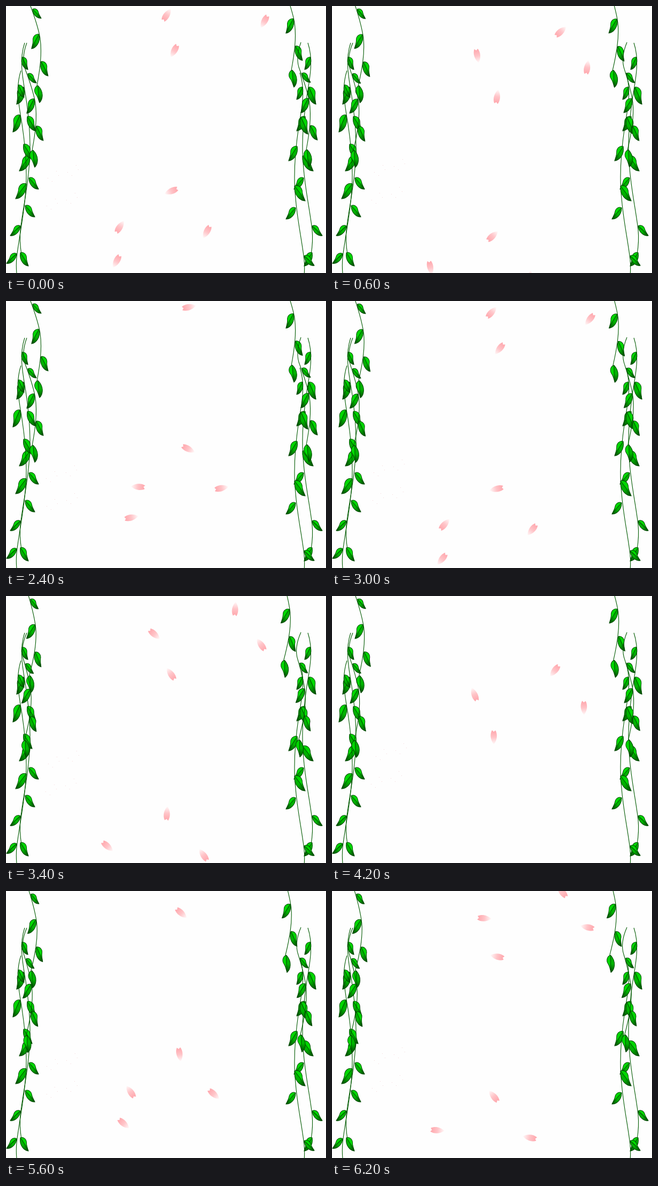
An HTML page with a canvas for the animation above (6400 ms loop, 600 px wide and 500 px high).

```html
<!DOCTYPE html>
<html lang="en">
<head>
<meta charset="utf-8">
<title>Vines and petals</title>
<style>
html, body { margin: 0; width: 100%; height: 100%; overflow: hidden; background: #fefefe; }
canvas { display: block; }
</style>
</head>
<body>
<canvas id="stage" width="600" height="500"></canvas>
<script>
const ctx = document.getElementById('stage').getContext('2d');
const LOOP = 6400, STEP = 200, FALL = 2960, SWAY = 2440, RAD = Math.PI / 180;

// Leaves: base x, base y, tip x, tip y, relative to the top of the stem
const longVine = {
  stem: new Path2D('M0 0C-10 30 -5 60 2 100C8 140 13 190 8 235C5 275 -4 315 -8 350Q-10 372 -6 396'),
  leaves: [[-5, 27, 6, 50], [-2, 83, -15, 115], [5, 138, 21, 165], [10, 212, -10, 240],
    [8, 253, 26, 274], [-8, 343, -27, 361], [-8, 393, 7, 418]]
};
const shortVine = {
  stem: new Path2D('M0 0C-8 22 -8 38 -2 52C4 68 12 90 16 112C20 140 16 170 10 202'),
  leaves: [[2, 58, 18, 75], [14, 105, 0, 132], [18, 156, 31, 183], [12, 201, 15, 233]]
};

const leafShape = new Path2D('M0 0C.05 .21 .3 .29 .5 .16C.66 .06 .85 .05 1 0C.84 -.22 .38 -.33 0 0Z');
const leafShade = new Path2D('M0 0Q.5 .04 1 0C.84 -.22 .38 -.33 0 0Z');
const leafRib = new Path2D('M0 0Q.5 .04 1 0');
const leafFill = gradient(0, 1, ['#00d000', '#00dc00', '#005000']);

const petalShape = new Path2D('M14 0C7 -6 -4 -8 -12 -3.5L-9.5 0L-12.5 3C-5 7.5 6 6.5 14 0Z');
const petalFill = gradient(-12, 14, ['#ffa6ac', '#ffc4c8', '#fffafa']);

// Start, travel per fall, phase of the flutter and first angle
const pair = { x: 501, y: 36, dx: -108, dy: 394, phase: 165, angle: 133 };
const petals = [
  pair,
  { ...pair, x: pair.x - 169, y: pair.y + 55 },
  { x: 307, y: 20, dx: -88, dy: 397, phase: 250, angle: -52 },
  { x: 455, y: -29, dx: -128, dy: 383, phase: 165, angle: 172 }
];

function gradient(from, to, colors) {
  const g = ctx.createLinearGradient(from, 0, to, 0);
  colors.forEach((c, i) => g.addColorStop(i / (colors.length - 1), c));
  return g;
}

function drawLeaf([x, y, tx, ty]) {
  const dx = tx - x, dy = ty - y, size = Math.hypot(dx, dy);
  ctx.save();
  ctx.translate(x, y);
  ctx.rotate(Math.atan2(dy, dx));
  ctx.scale(size, dx < 5 ? size : -size);
  ctx.fillStyle = leafFill;
  ctx.fill(leafShape);
  ctx.fillStyle = 'rgba(0,60,0,.25)';
  ctx.fill(leafShade);
  ctx.lineWidth = 1 / size;
  ctx.strokeStyle = '#004a00';
  ctx.stroke(leafShape);
  ctx.stroke(leafRib);
  ctx.restore();
}

function drawVine(vine, x, y, turn = 0, flip = 1) {
  ctx.save();
  ctx.translate(x, y);
  ctx.scale(flip, 1);
  ctx.rotate(turn);
  ctx.lineWidth = 1.1;
  ctx.strokeStyle = '#005a00';
  ctx.stroke(vine.stem);
  vine.leaves.forEach(drawLeaf);
  ctx.restore();
}

// n counts falls since the petals set off
function drawPetals(n) {
  ctx.fillStyle = petalFill;
  for (const p of petals) {
    const flutter = Math.cos((360 * n - p.phase) * RAD);
    ctx.save();
    ctx.translate(p.x + p.dx * n + 17 * flutter, p.y + p.dy * n + 8 * flutter);
    ctx.rotate((p.angle + 720 * n + 15 * flutter) * RAD);
    ctx.fill(petalShape);
    ctx.restore();
  }
}

function drawSpecks(n) {
  if (n < -0.32 || n > 1.76) return;
  const drift = 2 * n ** 3 - 3.5 * Math.max(0, Math.sin(Math.PI * n));
  ctx.fillStyle = '#f4d6d8';
  for (let i = 0; i < 8; i++) {
    const a = i >> 2, b = i >> 1 & 1, c = i & 1;
    const x = 76 + 37 * a + 15.5 * b + c * (8 - 3.5 * b);
    const y = 374 - 11 * a - 13 * b + c * (6 + 2 * b);
    ctx.fillRect(Math.round(x + drift), Math.round(y - 52 * n), 1, 1);
  }
}

function draw(t) {
  ctx.fillStyle = '#fefefe';
  ctx.fillRect(0, 0, 600, 500);

  drawVine(longVine, 35, 69);
  drawVine(longVine, 28, 121);
  drawVine(longVine, 566, 69, 0, -1);
  drawVine(longVine, 551, 125, 0, -1);

  const turn = 0.038 * (1 - Math.cos(2 * Math.PI * (t + 80) / SWAY));
  for (const [x, y] of [[48, -52], [39, 69], [525, -81], [553, 68]]) {
    drawVine(shortVine, x, y, turn);
  }

  for (let k = -1; k < 3; k++) {
    const n = t / FALL % 1 + k;
    drawSpecks(n);
    drawPetals(n);
  }
}

const start = performance.now();
function tick() {
  const t = (performance.now() - start) % LOOP;
  draw(Math.floor(t / STEP) * STEP);
  requestAnimationFrame(tick);
}
tick();
</script>
</body>
</html>
```
